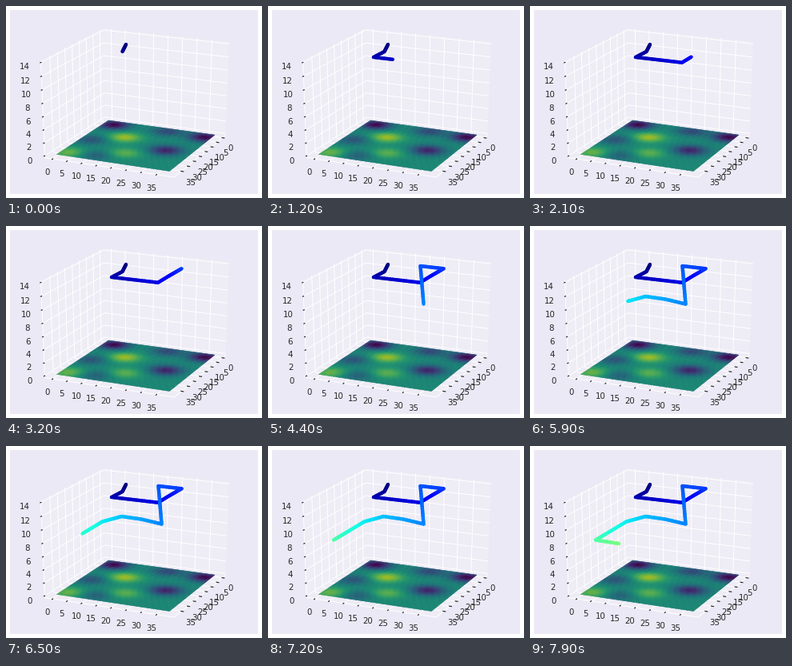
These frames come from a looping animation (320x240 px, 8 s). A matplotlib script:

```python
import numpy as np
import matplotlib.pyplot as plt
from matplotlib.animation import FuncAnimation
from matplotlib.collections import LineCollection, PolyCollection
from matplotlib.patches import Polygon, Rectangle

W, H, DPI = 320, 240, 80
PX = 72 / DPI                       # one pixel in points
AZIM, ELEV, DIST = np.radians(24), np.radians(23), 10
E = 0.5 + 1 / 48                    # panes lie a little outside the data cube
SIZE = 38                           # side of the height map
DARK = "#262626"


def project(x, y, z):
    """Perspective view of the unit cube centred on 0, in stage pixels."""
    x, y, z = np.broadcast_arrays(x, y, z)
    side = y * np.cos(AZIM) - x * np.sin(AZIM)
    near = x * np.cos(AZIM) + y * np.sin(AZIM)
    up = z * np.cos(ELEV) - near * np.sin(ELEV)
    depth = DIST - near * np.cos(ELEV) - z * np.sin(ELEV)
    return np.stack([164.2 + side / depth * 1676,
                     116.9 - up / depth * 1243], axis=-1)


def flat(v):
    """Map coordinate to cube coordinate, with a 5 % margin on both sides."""
    return (v / SIZE - 0.5) / 1.1


def level(v):
    return v / 14 - 0.5


def label(pos, value, dy):
    x, y = project(*pos)
    ax.text(x, y + dy, str(value), ha="center", va="center_baseline",
            fontsize=10.3 * PX, family="DejaVu Sans", color=DARK)


fig = plt.figure(figsize=(W / DPI, H / DPI), dpi=DPI, facecolor="white")
ax = fig.add_axes([0, 0, 1, 1])
ax.set_xlim(0, W)
ax.set_ylim(H, 0)
ax.axis("off")
ax.add_patch(Rectangle((5, 5), 310, 230, fc="#ece9f6", lw=0))

# panes
a, b = np.array([-E, E, E, -E]), np.array([-E, -E, E, E])
for corners in [(a, -E, b), (-E, a, b), (a, b, -E)]:
    ax.add_patch(Polygon(project(*corners), fc="#eeecf5", lw=0))

# grid, axis lines, ticks and labels
ends = np.array([-E, E])
tick = np.array([E - 0.1 / 12, E + 0.2 / 12])
grid = [project(E, ends, -E), project(ends, E, -E), project(E, -E, ends)]
marks = []
for v in range(0, 36, 5):
    p = flat(v)
    grid += [project(p, -E, ends), project(p, ends, -E),
             project(-E, p, ends), project(ends, p, -E)]
    marks += [project(p, tick, -E), project(tick, p, -E)]
    label((p, E + 0.07, -E - 0.09), v, 1.5)
    label((E + 0.09, p, -E - 0.09), v, 0.8)
for v in range(0, 15, 2):
    p = level(v)
    grid += [project(ends, -E, p), project(-E, ends, p)]
    marks.append(project(tick, -E, p))
    label((E + 0.083, -E - 0.083, p), v, 3)
ax.add_collection(LineCollection(grid, colors="white", linewidths=PX, zorder=1))
ax.add_collection(LineCollection(marks, colors=DARK, linewidths=1.2 * PX,
                                 zorder=2))

# height map: hills and hollows as (u, v, amplitude)
BUMPS = [(0.10, 0.10, -0.55), (0.10, 0.95, -0.55), (0.55, 0.78, -0.45),
         (0.38, 0.33, 0.34), (0.92, 0.08, 0.25), (0.75, 0.50, 0.22),
         (0.55, 0.10, -0.25), (0.08, 0.60, -0.30), (0.90, 0.30, -0.20)]
i, j = (k.ravel() for k in np.mgrid[0:SIZE, 0:SIZE])
u, v = (i + 0.5) / SIZE, (j + 0.5) / SIZE
value = 0.56 + sum(h * np.exp(-((u - cu) / 0.13) ** 2 - ((v - cv) / 0.14) ** 2)
                   for cu, cv, h in BUMPS)
cells = np.stack([project(flat(i + di), flat(j + dj), -0.5)
                  for di, dj in [(0, 0), (1, 0), (1, 1), (0, 1)]], axis=1)
shades = plt.cm.viridis(np.clip(value, 0, 1))
shades[:, :3] *= 0.84
ax.add_collection(PolyCollection(cells, facecolors=shades, edgecolors=shades,
                                 linewidths=0.6 * PX, zorder=3))

# corners of the trail: seconds, x, y
PATH = np.array([
    (-0.30, 150.0, 48.0), (0.40, 145.5, 57.0), (0.85, 132.0, 64.0),
    (1.70, 190.0, 70.7), (2.15, 203.0, 62.8), (3.20, 219.5, 53.3),
    (3.65, 190.5, 50.0), (4.40, 194.5, 97.5), (4.85, 169.0, 91.5),
    (5.30, 144.5, 88.0), (5.95, 120.5, 94.5), (6.50, 95.5, 109.5),
    (7.20, 82.0, 117.5), (7.90, 111.0, 122.0)])
START, STEP = -0.3, 0.05
times = np.arange(START, 7.92, STEP)
points = np.stack([np.interp(times, PATH[:, 0], PATH[:, k]) for k in (1, 2)],
                  axis=-1)
segments = np.stack([points[:-1], points[1:]], axis=1)
late = np.maximum(times[1:], 0)
hues = plt.cm.jet(0.05 * late + 0.0016 * late ** 2)

trail = LineCollection([], linewidths=4.4 * PX, capstyle="round", zorder=5)
ax.add_collection(trail)


def draw(frame):
    now = max(frame * 0.1, 0.4)
    n = int(round((now - START) / STEP))
    trail.set_segments(segments[:n])
    trail.set_color(hues[:n])
    return [trail]


anim = FuncAnimation(fig, draw, frames=80, interval=100, repeat=True,
                     repeat_delay=0, blit=False)
plt.show()
```
